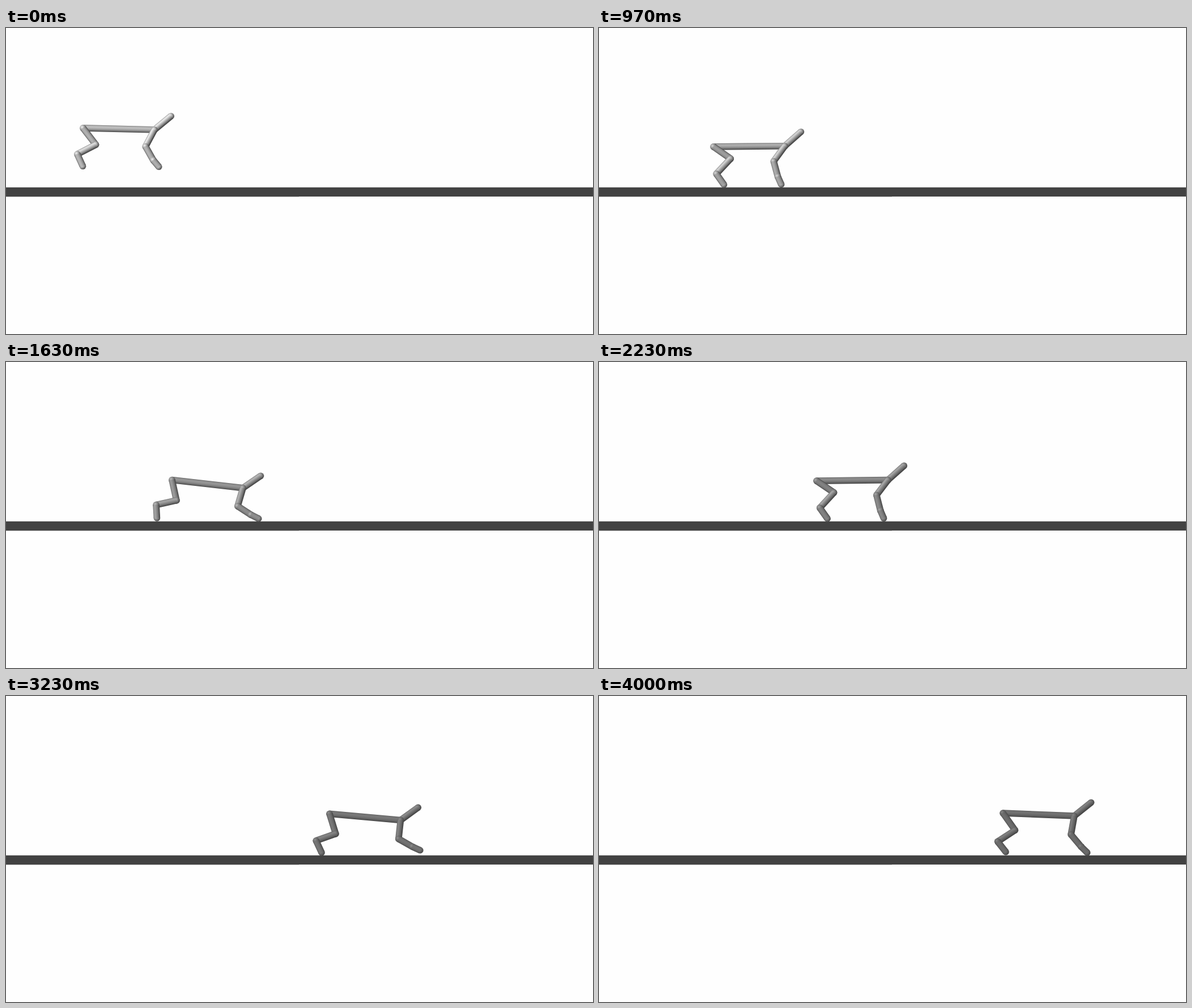
Write an HTML page that moves like this. It is 1036x541 px and loops after 4.03 s.

```html
<!DOCTYPE html>
<html lang="en">
<head>
<meta charset="utf-8">
<title>Runner</title>
<style>
html, body { margin: 0; width: 100%; height: 100%; overflow: hidden; background: #fefefe; }
svg { display: block; width: 100%; height: 100%; }
</style>
</head>
<body>
<svg id="stage" viewBox="0 0 1036 541">
  <defs id="defs">
    <radialGradient id="ball" cx=".34" cy=".36" r=".7">
      <stop offset="0"/><stop offset=".4"/><stop offset="1"/>
    </radialGradient>
  </defs>
  <path d="M0 281.7H1036V298H517V298.3H0Z" fill="#424242"/>
</svg>
<script>
const LOOP = 4030, START = 100, RADIUS = 5.8, FLOOR = 276.9;
const LIGHT = [-0.48, -0.38, 0.79];

// Each angle swings from low to high and back once per stride:
// low, high, phase where the rise begins, share of the stride spent rising.
// rest is the angle before the fall, bounce a second beat.
const JOINTS = {
  torso:      { low: -1.4, high: 6.5, from: -0.05, rise: 0.65, rest: 1.4 },
  rearThigh:  { low: 28, high: 79, from: -0.06, rise: 0.62, rest: 52.5 },
  rearShin:   { low: 129, high: 167.5, from: -0.05, rise: 0.65, rest: 152.7 },
  rearFoot:   { low: 48, high: 80, from: 0.1, rise: 0.52, rest: 65.6, bounce: 7 },
  frontThigh: { low: 95, high: 130, from: 0.34, rise: 0.68, rest: 118 },
  frontShin:  { low: 27, high: 80, from: 0.49, rise: 0.5, rest: 60.5 },
  frontFoot:  { low: 22, high: 70, from: 0.5, rise: 0.5, rest: 50 },
};
const HEAD_TILT = -41;

// Bones: start joint, end joint, length, angle
const BONES = [
  ['hip', 'neck', 126, 'torso'],
  ['neck', 'head', 38, 'head'],
  ['hip', 'knee', 37, 'rearThigh'],
  ['knee', 'heel', 36.7, 'rearShin'],
  ['heel', 'toe', 23.3, 'rearFoot'],
  ['neck', 'elbow', 33.4, 'frontThigh'],
  ['elbow', 'wrist', 28, 'frontShin'],
  ['wrist', 'paw', 15, 'frontFoot'],
];

// Key points of the run: time, hip position, strides made
const ROUTE = [
  [START, 136, -1.05], [630, 152, -0.25], [970, 202, 0.09], [1630, 293, 1.6],
  [2230, 384, 3.08], [2670, 454, 4], [3230, 571, 5.42], [4000, 713, 7.26],
];

const clamp = v => Math.min(1, Math.max(0, v));
const ease = u => (1 - Math.cos(Math.PI * u)) / 2;
const mix = (a, b, u) => a + (b - a) * u;

// Smooth curve through one column of the route
function along(t, col) {
  const last = ROUTE.length - 1;
  const key = i => ROUTE[Math.min(last, Math.max(0, i))];
  const next = ROUTE.findIndex(k => k[0] > t);
  if (next < 1) return key(next < 0 ? last : 0)[col];
  const slope = i => (key(i + 1)[col] - key(i - 1)[col]) / (key(i + 1)[0] - key(i - 1)[0]);
  const a = key(next - 1), b = key(next), span = b[0] - a[0];
  const u = (t - a[0]) / span, d = b[col] - a[col];
  const m0 = span * slope(next - 1), m1 = span * slope(next);
  return a[col] + u * (m0 + u * (3 * d - 2 * m0 - m1 + u * (m0 + m1 - 2 * d)));
}

function swing({ low, high, from, rise, bounce = 0 }, phase) {
  const p = phase - from - Math.floor(phase - from);
  const u = p < rise ? p / rise : (1 - p) / (1 - rise);
  return mix(low, high, ease(u)) + bounce * Math.cos(4 * Math.PI * (phase - 0.1));
}

function joints(t) {
  const phase = along(t, 2), awake = ease(clamp((t - START) / 380)), angles = {};
  for (const name in JOINTS) {
    angles[name] = mix(JOINTS[name].rest, swing(JOINTS[name], phase), awake);
  }
  angles.head = angles.torso + HEAD_TILT;

  const at = { hip: [along(t, 1), 0] };
  for (const [from, to, length, name] of BONES) {
    const r = angles[name] * Math.PI / 180, [x, y] = at[from];
    at[to] = [x + length * Math.cos(r), y + length * Math.sin(r)];
  }
  // The lower foot rests on the floor once the fall is over
  const lift = 31.6 * (1 - clamp((t - START) / 190) ** 2);
  const drop = FLOOR - lift - Math.max(at.toe[1], at.paw[1]);
  for (const name in at) at[name][1] += drop;
  return at;
}

const stage = document.getElementById('stage'), defs = document.getElementById('defs');
function set(el, attrs) {
  for (const name in attrs) el.setAttribute(name, attrs[name]);
}
function add(parent, tag, attrs) {
  const el = document.createElementNS('http://www.w3.org/2000/svg', tag);
  set(el, attrs);
  parent.append(el);
  return el;
}

const ACROSS = Array.from({ length: 9 }, (_, i) => i / 4 - 1);
const parts = BONES.map((bone, i) => {
  const grad = add(defs, 'linearGradient', { id: 'tube' + i, gradientUnits: 'userSpaceOnUse' });
  const stops = ACROSS.map(u => add(grad, 'stop', { offset: (u + 1) / 2 }));
  const balls = [0, 1].map(() => add(stage, 'circle', { r: RADIUS, fill: 'url(#ball)' }));
  const tube = add(stage, 'line', { stroke: `url(#tube${i})`, 'stroke-width': 2 * RADIUS });
  return { grad, stops, balls, tube };
});
const ballStops = document.querySelectorAll('#ball stop');

function grey(v) {
  const c = Math.round(v);
  return `rgb(${c},${c},${c})`;
}

function draw(t) {
  const at = joints(t);
  // The lamp stays behind at the left
  const near = Math.exp((136 - at.hip[0]) / 280);
  const dark = 68, peak = 106 + 94 * near, gloss = 12 + 30 * near;
  [peak + gloss, peak * 0.9, dark].forEach((v, i) => set(ballStops[i], { 'stop-color': grey(v) }));

  BONES.forEach(([from, to], i) => {
    const [x1, y1] = at[from], [x2, y2] = at[to];
    const { grad, stops, balls, tube } = parts[i];
    const len = Math.hypot(x2 - x1, y2 - y1);
    const nx = (y1 - y2) / len, ny = (x2 - x1) / len;
    set(tube, { x1, y1, x2, y2 });
    set(balls[0], { cx: x1, cy: y1 });
    set(balls[1], { cx: x2, cy: y2 });
    set(grad, {
      x1: x1 - nx * RADIUS, y1: y1 - ny * RADIUS,
      x2: x1 + nx * RADIUS, y2: y1 + ny * RADIUS,
    });
    ACROSS.forEach((u, j) => {
      const lit = clamp(u * (nx * LIGHT[0] + ny * LIGHT[1]) + Math.sqrt(1 - u * u) * LIGHT[2]);
      set(stops[j], { 'stop-color': grey(mix(dark, peak, lit) + gloss * lit ** 12) });
    });
  });
}

// Thirty pictures per second, on a clock of 10 ms ticks
function pictureTime(ms) {
  const tick = Math.floor(ms / 10) * 10;
  if (tick < 130) return 0;
  const k = Math.floor((tick - 130) * 3 / 100);
  return Math.ceil(13 + 10 * k / 3) * 10;
}

const begin = performance.now();
function play() {
  draw(pictureTime((performance.now() - begin) % LOOP));
  requestAnimationFrame(play);
}
play();
</script>
</body>
</html>
```
